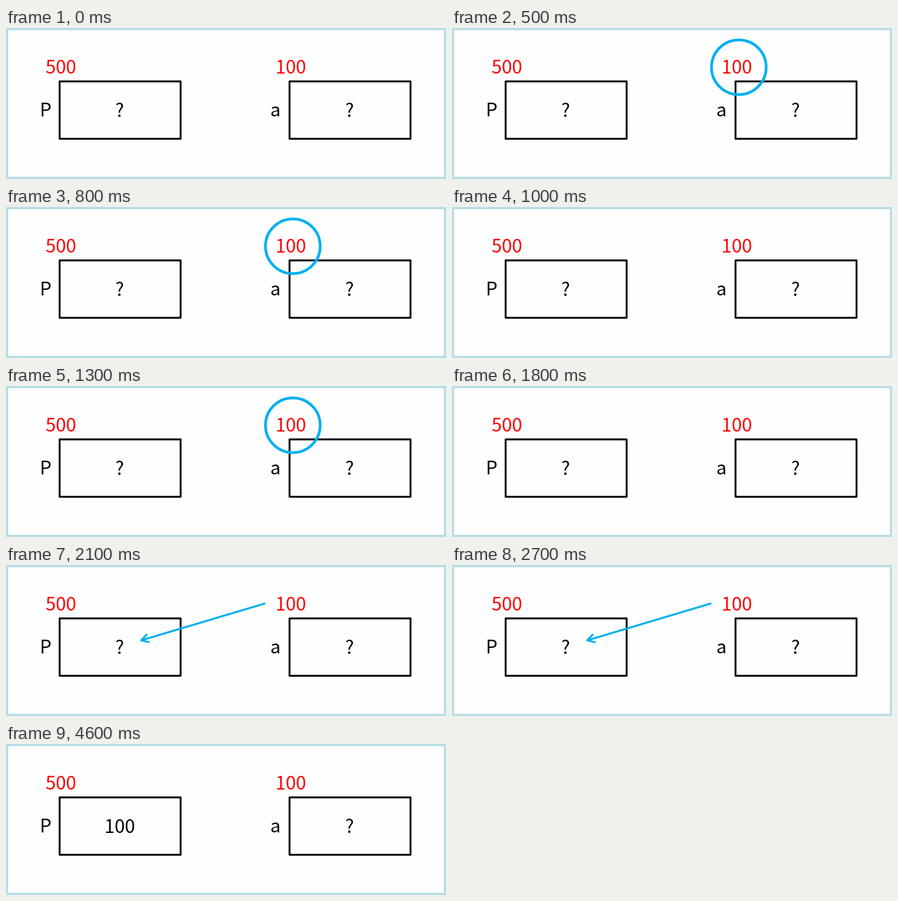
Animation, 800 px wide and 275 px high, one loop 5600 ms. Source, as an HTML page with a canvas:

```html
<!DOCTYPE html>
<html lang="en">
<head>
<meta charset="utf-8">
<title>Pointer assignment</title>
<style>
  html, body { margin: 0; width: 100%; height: 100%; overflow: hidden; background: #fefefe; }
  canvas { display: block; }
</style>
</head>
<body>
<canvas id="stage" width="800" height="275"></canvas>
<script>
const ctx = document.getElementById('stage').getContext('2d');
const LOOP = 5600;
const BLUE = '#00b0f0', RED = '#ff0000', BLACK = '#000';
const FONT = '33.5px "Noto Sans CJK KR", "Noto Sans CJK JP", "Noto Sans CJK SC", "Open Sans", sans-serif';

function text(str, x, y, color) {
  ctx.fillStyle = color;
  ctx.fillText(str, x, y);
}

function cell(x, name, address, value) {
  ctx.strokeStyle = BLACK;
  ctx.lineWidth = 3.4;
  ctx.lineJoin = 'round';
  ctx.strokeRect(x, 97.3, 220, 104.4);
  text(address, x + 2.3, 82.7, RED);
  text(name, x - 25.5, 161, BLACK);
  text(value, x + 109.3, 161.5, BLACK);
}

function ring() {
  ctx.strokeStyle = BLUE;
  ctx.lineWidth = 5;
  ctx.beginPath();
  ctx.arc(521.5, 71.5, 49.7, 0, Math.PI * 2);
  ctx.stroke();
}

function arrow(x0, y0, x1, y1) {
  const len = Math.hypot(x1 - x0, y1 - y0);
  ctx.save();
  ctx.translate(x1, y1);
  ctx.rotate(Math.atan2(y1 - y0, x1 - x0));
  ctx.strokeStyle = BLUE;
  ctx.lineWidth = 3.5;
  ctx.lineCap = ctx.lineJoin = 'round';
  ctx.beginPath();
  ctx.moveTo(-len, 0);
  ctx.lineTo(0, 0);
  ctx.moveTo(-12.5, -7.2);
  ctx.lineTo(0, 0);
  ctx.lineTo(-12.5, 7.2);
  ctx.stroke();
  ctx.restore();
}

function draw(t) {
  const within = (a, b) => t >= a && t < b;
  ctx.fillStyle = '#fefefe';
  ctx.fillRect(0, 0, 800, 275);
  ctx.strokeStyle = '#b7dde6';
  ctx.lineWidth = 4;
  ctx.lineJoin = 'miter';
  ctx.strokeRect(2, 2, 796, 271);

  ctx.font = FONT;
  ctx.textAlign = 'center';
  cell(97.5, 'P', '500', t < 3100 ? '?' : '100');
  cell(515.5, 'a', '100', '?');

  if (within(500, 1000) || within(1300, 1800)) ring();
  if (within(2100, 3100)) arrow(470.2, 70.2, 245.8, 137.3);
}

function tick() {
  draw(performance.now() % LOOP);
  requestAnimationFrame(tick);
}
tick();
</script>
</body>
</html>
```
